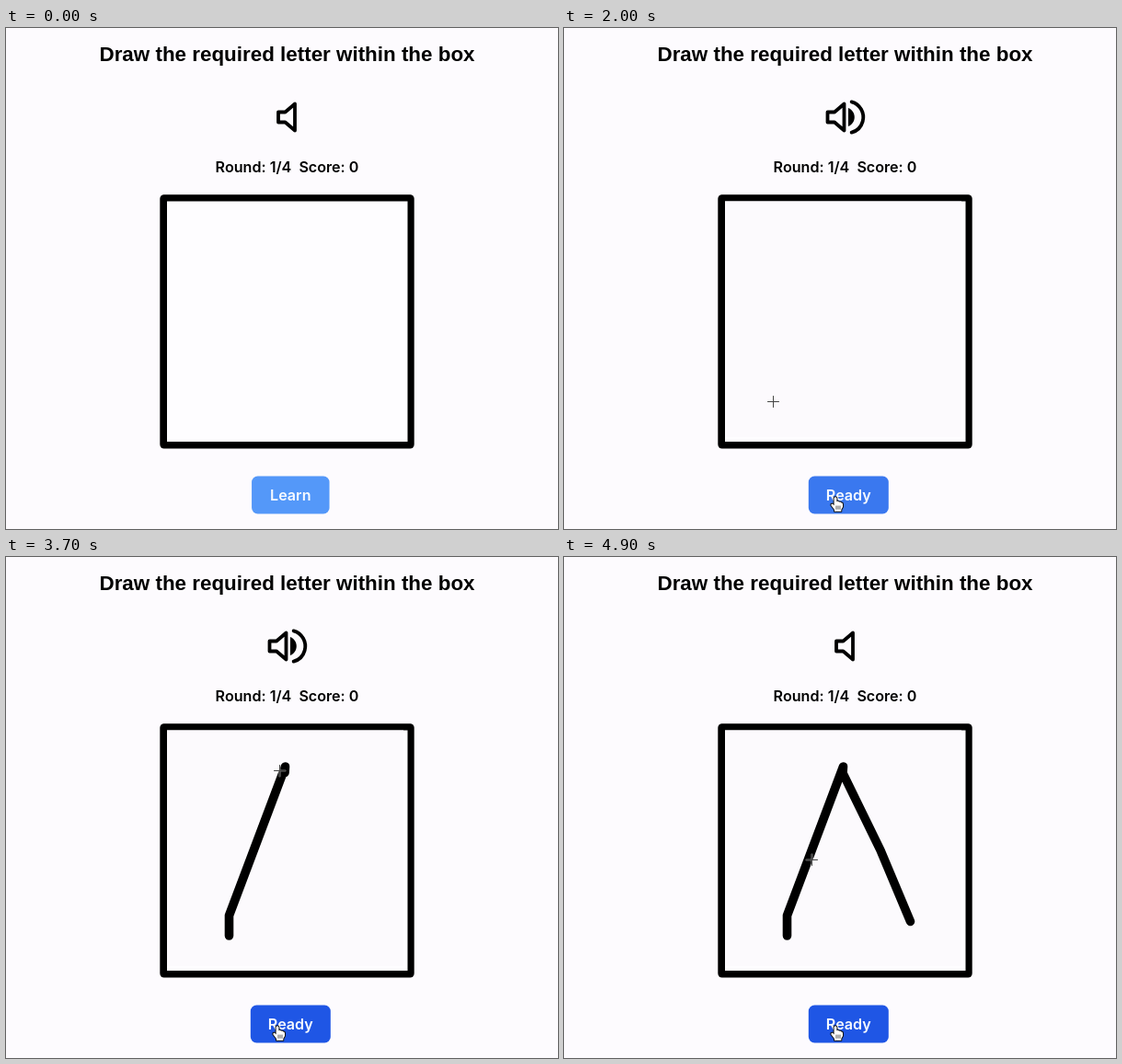
Animation of 600x545 px, one loop 5 s. Source, as an HTML page with a canvas:

```html
<!DOCTYPE html>
<html lang="en">
<head>
<meta charset="utf-8">
<title>Letter drawing</title>
<style>
  html, body { margin: 0; width: 100%; height: 100%; overflow: hidden; background: #fdfbfe; }
  canvas { display: block; }
</style>
</head>
<body>
<canvas id="stage" width="600" height="545"></canvas>
<script>
const ctx = document.getElementById('stage').getContext('2d');
const LOOP = 5000, STEP = 100;
const ARRIVE = 700, READY = 1900, MUTE = 4100;
const PEN_DOWN = 2820, PEN_UP = 4600, LEAD = 20; // the crosshair runs slightly ahead of the ink
const TITLE = 'bold 22.4px "Liberation Sans", Arial, sans-serif';
const BODY = '600 16.1px Inter, Arial, sans-serif';
const HAND = 'M-1.4 1.2Q0-.8 1.4 1.2V5.2Q3 4.2 4 5.8Q5.5 5 6.3 6.6Q8 6.2 8 8.2V11L6.3 14V15.8H-1V14L-4.6 9.2Q-4.8 7.2-3 7.8L-1.4 9.5z';
const ARROW = 'M0 0v14l3.2-3 2.3 5.3 2.3-1-2.3-5.1h4.6z';

// Corners of the drawing gesture
const GESTURE = [
  { t: 2000, x: 233, y: 410 },
  { t: 2300, x: 242.5, y: 412 },
  { t: PEN_DOWN, x: 242.5, y: 412 },
  { t: 2880, x: 242.5, y: 390 },
  { t: 3460, x: 303.5, y: 228 },
  { t: 3715, x: 303, y: 235 },
  { t: 4110, x: 344, y: 319 },
  { t: PEN_UP, x: 376.5, y: 396.5 },
  { t: 4900, x: 276, y: 333 }
];

const progress = (t, from, span) => Math.min(1, Math.max(0, (t - from) / span));
const mix = (a, b, p) => a + (b - a) * p;

function penAt(t) {
  const next = Math.max(1, GESTURE.findIndex(k => k.t >= t));
  const b = t > GESTURE.at(-1).t ? GESTURE.at(-1) : GESTURE[next];
  const a = GESTURE[GESTURE.indexOf(b) - 1];
  const p = progress(t, a.t, b.t - a.t);
  return [mix(a.x, b.x, p), mix(a.y, b.y, p)];
}

function label(text, x, y, font, color = '#000') {
  ctx.font = font;
  ctx.fillStyle = color;
  ctx.fillText(text, x, y);
}

function stroke(path, width, color = '#000') {
  ctx.lineWidth = width;
  ctx.strokeStyle = color;
  ctx.stroke(path);
}

function roundBox(x, y, w, h, r, color) {
  ctx.fillStyle = color;
  ctx.beginPath();
  ctx.roundRect(x, y, w, h, r);
  ctx.fill();
}

function shape(d, x, y, fill, outline) {
  const path = new Path2D(d);
  ctx.save();
  ctx.translate(x, y);
  stroke(path, 2, outline);
  ctx.fillStyle = fill;
  ctx.fill(path);
  ctx.restore();
}

function speaker(loud) {
  const x = loud ? 286.5 : 296;
  stroke(new Path2D(`M${x} 91.5h7.5L${x + 18} 82.5v29L${x + 7.5} 102.5h-7.5z`), 3.8);
  if (!loud) return;
  ctx.fillStyle = '#000';
  ctx.fill(new Path2D('M309 87C318 91 318 103 309 107z'));
  const wave = new Path2D();
  wave.arc(308, 97, 17.3, -1.3, 1.3);
  stroke(wave, 3.8);
}

function ink(t) {
  const path = new Path2D();
  const end = Math.min(t, PEN_UP);
  for (const k of GESTURE) if (k.t >= PEN_DOWN && k.t <= end) path.lineTo(k.x, k.y);
  path.lineTo(...penAt(end));
  stroke(path, 9.6);
}

function crosshair(t) {
  const [x, y] = penAt(t + LEAD).map((v, i) => Math.floor(v - [6.5, 4][i]) + .5);
  const path = new Path2D(`M${x - 6} ${y}h12M${x} ${y - 6}v12`);
  stroke(path, 2.2, 'rgba(255,255,255,.45)');
  stroke(path, 1, '#444');
}

function button(ready, t) {
  const p = progress(t, ready ? READY - 15 : ARRIVE - 100, 235);
  const color = `rgb(${mix(84, 31, p)} ${mix(152, 86, p)} ${mix(249, 229, p)})`;
  const width = ready ? 87 : 84.5;
  roundBox(309.3 - width / 2, 487.5, width, 41, 6.5, color);
  label(ready ? 'Ready' : 'Learn', 309.3, 514, BODY, '#f7faff');
}

function pointer(ready, t) {
  if (t < 100) return;
  if (t < ARRIVE) {
    const p = progress(t, 100, 300);
    shape(ARROW, mix(588, 418, p), mix(537, 507, p), '#000', '#fff');
    return;
  }
  const x = ready ? 295 : mix(338, 301, progress(t, ARRIVE, 100));
  const y = ready ? 510 : 508;
  shape(HAND, x, y, '#fff', '#111');
  stroke(new Path2D(`M${x + 1} ${y + 10}v3.4m2-3.4v3.4m2-3.4v3.4`), .8, '#333');
}

function draw(t) {
  const ready = t >= READY;
  ctx.fillStyle = '#fdfbfe';
  ctx.fillRect(0, 0, 600, 545);
  label('Draw the required letter within the box', 305.5, 35.7, TITLE);
  speaker(ready && t < MUTE);
  label('Round: 1/4  Score: 0', 305.5, 157, BODY);

  roundBox(167.3, 181.2, 276.4, 276.4, 4.5, '#000');
  ctx.fillStyle = '#fefdff';
  ctx.fillRect(175, 188.5, 261.5, 261.5);
  if (ready) {
    ctx.fillStyle = '#fcfafd';
    ctx.fillRect(175, 188.5, 257, 256.5);
  }

  if (t > PEN_DOWN) ink(t);
  if (ready) crosshair(t);
  button(ready, t);
  pointer(ready, t);
}

ctx.textAlign = 'center';
ctx.lineCap = ctx.lineJoin = 'round';
const start = performance.now();
function tick() {
  const t = (performance.now() - start) % LOOP;
  draw(Math.floor(t / STEP) * STEP);
  requestAnimationFrame(tick);
}
tick();
</script>
</body>
</html>
```
